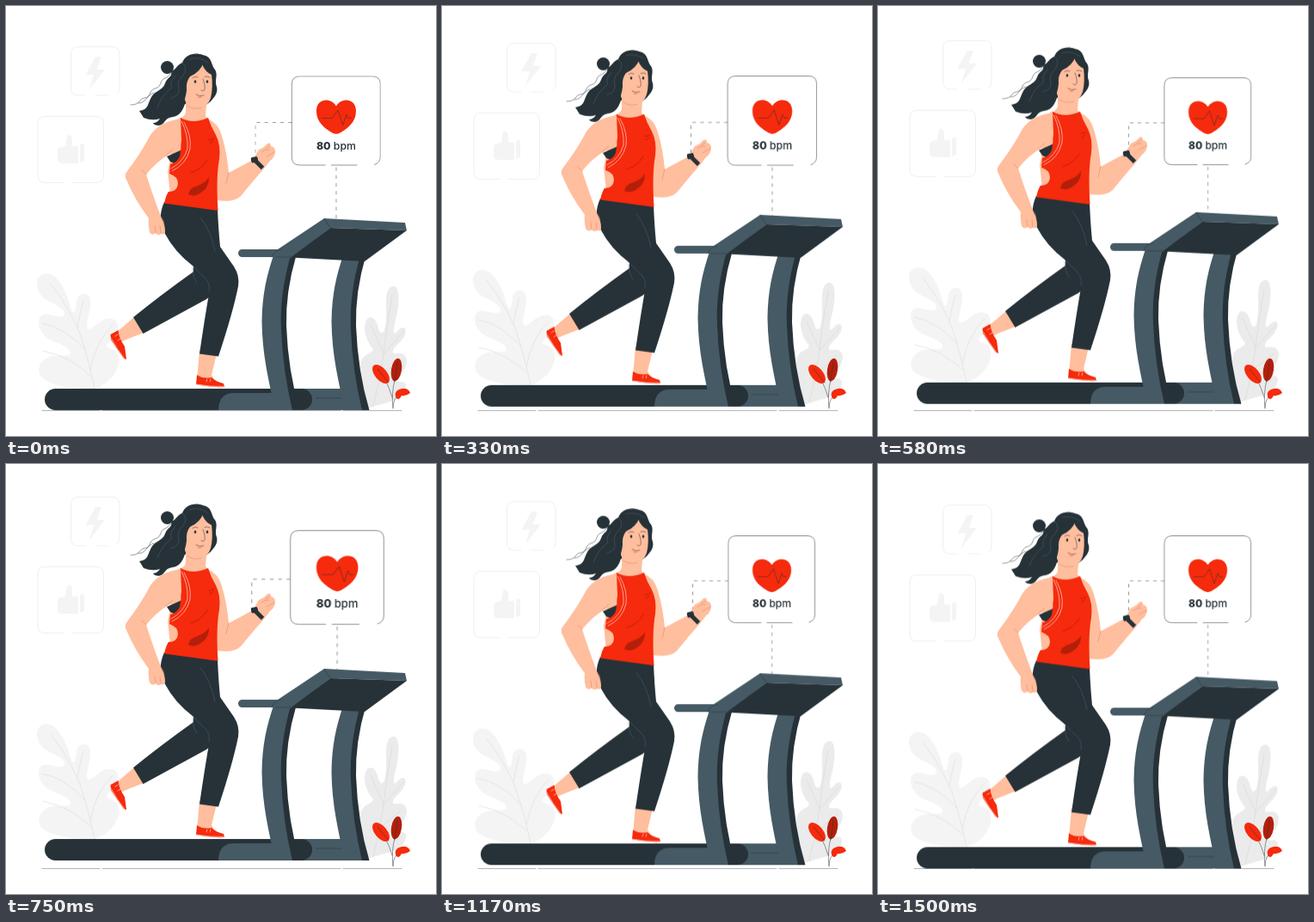
Animation, 500 px wide and 500 px high, one loop 1540 ms. Source, as an HTML page without scripts:

```html
<!DOCTYPE html>
<html lang="en">
<head>
<meta charset="utf-8">
<title>Treadmill run</title>
<style>
  :root { --ink: #263238; --slate: #455a64; --red: #f62a0c; --wine: #b31f0b; --skin: #ffbe9d; }
  html, body { margin: 0; width: 100%; height: 100%; overflow: hidden; background: #fff; }
  svg { display: block; width: 100vw; height: 100vh; }
  .bob { animation: bob 1540ms linear -37ms infinite; }
  .beat { transform-origin: 363px 161px; animation: beat 1540ms linear -37ms infinite; }
  @keyframes bob {
    0%, 100% { transform: translateY(.4px); }
    50% { transform: translateY(-9.2px); }
  }
  @keyframes beat {
    0%, 30%, 40%, 60%, 100% { transform: scale(1); }
    10%, 50% { transform: scale(1.09); }
  }
  .ink { fill: var(--ink); }
  .slate { fill: var(--slate); }
  .red { fill: var(--red); }
  .wine { fill: var(--wine); }
  .skin { fill: var(--skin); }
  .pale { fill: #f4f4f4; }
  .line { fill: none; stroke: var(--ink); stroke-width: .5; stroke-linecap: round; stroke-linejoin: round; }
  .line.frame { stroke: #ebebeb; stroke-width: .8; }
  .line.vein { stroke: #e3e3e3; stroke-width: .8; }
  .line.fold { stroke: #52656e; }
  .line.soft { stroke: #d98267; }
  .line.trim { stroke: #ffc4b8; stroke-width: .8; }
  .line.dash { stroke: #6b7478; stroke-dasharray: 4 5; stroke-linecap: butt; stroke-width: .7; }
  .line.ground { stroke-opacity: .7; }
  text { font: 500 12px Inter, sans-serif; fill: var(--ink); }
  .strong { font-weight: 800; }
</style>
</head>
<body>
<svg viewBox="0 0 500 500" xmlns="http://www.w3.org/2000/svg">
  <path class="line ground" d="M42 470.500H109M112 470.500H389M392 470.500H460"/>

  <!-- Badges and foliage -->
  <g class="bob">
    <path class="line frame" d="M92 104H84Q75.500 104 75.500 95.500V56Q75.500 47.500 84 47.500H123.500Q132 47.500 132 56V95.500Q132 100 129 102M104 104H119"/>
    <path class="pale" d="M104 59L92.500 80H102L97 97L115 74H105.500L111 59Z"/>
    <path class="line frame" d="M67 205.500H45.500Q37 205.500 37 197V137Q37 128.500 45.500 128.500H105Q113.500 128.500 113.500 137V197Q113.500 205.500 105 205.500H77"/>
    <path class="pale" d="M60 168Q60 165 64 164L69 163L71 151Q76 148 77 155V163H84V183H66Q60 183 60 178ZM86 161L91 160V180L86 182Z"/>

    <path class="pale" d="M36 323C36 312 48 307 58 316C68 326 73 342 76 353C79 360 81 354 82 344C83 333 96 331 98 342C99 352 95 361 94 371C94 383 104 369 116 364C129 361 133 371 129 379C124 388 117 392 117 396C120 400 129 398 131 407C134 419 124 438 103 445C82 446 57 443 44 434C34 427 38 414 48 409C57 404 73 409 75 404C76 397 61 393 51 388C40 382 35 369 40 361C48 354 61 365 67 360C72 354 59 348 51 344C41 339 36 332 36 323Z"/>
    <path class="line vein" d="M52 323Q82 362 91 397Q99 425 103 445M90 343Q85 360 83 374M42 369Q69 374 92 400M43 401Q76 408 98 430M124 371Q104 390 98 424"/>

    <path fill="#ebebeb" d="M442 344C442 329 447 325 452 326C458 329 457 345 455 356C453 366 450 374 451 380C454 383 456 373 463 374C468 379 461 389 454 395C449 400 448 405 454 404C464 402 468 409 465 418C462 428 453 430 453 436C456 439 463 434 465 441C465 453 451 460 440 462L417 469L412 455C410 440 411 425 413 414C415 404 426 405 427 399C423 394 417 386 417 374C418 358 428 359 432 371C434 380 437 383 440 377C443 367 442 354 442 344Z"/>
    <path class="line" stroke-opacity=".12" d="M449 337Q442 375 439 405Q435 436 427 465M424 371L439 404M462 379L440 404M460 411L436 431"/>
  </g>

  <!-- Pulse card -->
  <g class="beat">
    <path class="line dash" d="M333 136H291.500V178M383.500 187V245"/>
    <rect x="333" y="83.500" width="101" height="101" rx="9" fill="#fff"/>
    <path class="line" d="M427 184Q433.700 182 433.700 175V92.500Q433.700 83.500 425 83.500H342Q333 83.500 333 92.500V175.500Q333 184.500 342 184.500H371M378 184.500H407"/>
    <path class="red" d="M383.500 117.500C378 107.500 361 108 361 123C361 136 371 143 379.500 148Q383.500 150 387.500 148C396 143 406 136 406 123C406 108 389 107.500 383.500 117.500Z"/>
    <path class="line" d="M367 131H379L385.500 122L391 139L395 127L397 131H400.500"/>
    <text x="361" y="166.500"><tspan class="strong">80</tspan> bpm</text>
  </g>

  <g class="bob">
    <!-- Deck -->
    <rect class="slate" x="325" y="445" width="86" height="25" rx="12.500"/>
    <path class="line" d="M360 456H404M399 445.300Q410.700 446 410.700 457.500Q410.700 469 399 469.700"/>
    <rect class="ink" x="45" y="445" width="311" height="25" rx="12.500"/>
    <path class="slate" d="M247 470C247 457 253 450 265 450H322V470Z"/>

    <!-- Uprights -->
    <g id="post">
      <path class="ink" d="M325 290H337.500Q325 332 326 372Q328 425 341.500 470H322L312 372Z"/>
      <path class="slate" d="M311 290H331Q318 336 320 376Q322 425 333 470H313C305 434 298 405 297.500 367C298 335 303 314 311 290Z"/>
    </g>
    <use href="#post" x="81" y="0"/>

    <!-- Console -->
    <path class="slate" d="M274.500 283H316L370 247L464 252L466 261L377 258L332 293H311L312 292H274.500A4.500 4.500 0 0 1 274.500 283Z"/>
    <path class="ink" d="M377 258L466 261L417 297L331 292.500Z"/>
    <path class="line" d="M370 247.500L377 258M309 292Q312 284 320 283M313 292H331"/>

    <!-- Back leg -->
    <path class="skin" d="M150 361L160 380L142 387L133 391L129 379Z"/>
    <path class="red" d="M121.500 382L130.500 377Q131 386 138 396L140 411L137 410Q129 399 122 388Z"/>
    <path class="line trim" d="M122 386Q129 399 138 410.500M127 384l3-2M130 389l3-2"/>
    <path class="ink" d="M218 296V309Q180 336 148 362L159.500 381L233 341Q242 336 246 318Z"/>

    <!-- Front leg -->
    <path class="skin" d="M225 400H246L239 429L244 437L222 435Z"/>
    <path class="red" d="M222 429Q229 434 239 432Q244 437 253 439L254 443Q238 444 221 440Z"/>
    <path class="line trim" d="M221 440Q238 443 253 442.500M234 434l-1 3M238 434l-1 3"/>
    <path class="ink" d="M184 228L246 236Q247 260 249 280L265 303Q272 314 270 326Q264 356 247 407.500L225 404.500Q231 363 237 329Q233 316 217 302Q196 286 185 265Q175 248 184 228Z"/>
    <path class="line fold" d="M226 246Q238 261 243 285M217 302Q225 310 232 317Q238 324 236 332M217 304Q217 316 222 322"/>

    <!-- Far arm -->
    <path class="skin" d="M234 131Q247 136 251 151Q257 171 259 194L287 179L294 167Q300 165 304 160Q308 158 308 163Q313 164 313 169Q313 176 307 180L300 189Q286 205 273 221Q265 229 245 226L238 165Z"/>
    <path class="line soft" d="M297 170Q301 166 306 167M303 175L312 170M306 163L302 166M259 194L256 206"/>
    <path d="M288 178L298.500 188.500" fill="none" stroke="#263238" stroke-width="5"/>
    <rect class="ink" x="285" y="175.500" width="8" height="6.500" rx="2" transform="rotate(-12 289 179)"/>

    <!-- Hair behind -->
    <circle class="ink" cx="187.500" cy="71.500" r="7.500"/>
    <path class="ink" d="M192 76C198 74 199 68 205 66C208 57 219 53 229 57C240 59 238 68 243 74C247 80 242 87 245 94C247 102 241 107 238 111L228 119L208 114C205 123 201 128 194 129C184 130 185 138 178 139Q172 139 171 136Q176 136 179 131Q170 134 160 130Q157 125 155 122C165 121 165 114 168 108C172 98 182 99 185 90C187 83 194 83 192 76Z"/>
    <path class="line" d="M145 115C157 115 154 108 161 107C169 106 166 98 173 96C182 94 178 86 185 84C190 82 190 78 196 77M154 113C163 113 163 104 172 101"/>

    <!-- Torso -->
    <path class="skin" d="M209 106L233 115L232 128L238 135V228H192L188 192L193 168L200 131Q207 130 209 124Z"/>
    <path class="ink" d="M187 175L205 167L202 186L191 181Z"/>
    <path class="red" d="M203 130Q217 138 235 130Q238 140 244 150Q250 162 248 178Q244 200 246.500 238L184 229.500Q186 220 189 216Q199 216 200 207Q200 198 190 195L191 184Q199 182 202 175Q206 157 200 136Z"/>
    <path class="line trim" d="M204 134Q212 149 211 166Q207 181 192 189M207 135Q216 151 214 166Q210 184 193 192"/>
    <path class="wine" d="M212 219Q214 211 223 209Q233 205 236 199Q236 211 228 216Q220 223 212 219Z"/>
    <path class="line" style="stroke:#8e1808" d="M215 194Q228 190 234 179M236 156L242 154M237 160L241 157"/>

    <!-- Near arm -->
    <path class="skin" d="M203 131Q178 135 168 150Q157 171 141 192Q137 197 140 202Q150 226 166 247Q165 254 167 263Q170 268 174 264Q177 268 180 265Q185 267 185 262Q185 254 181 247Q172 224 163 196Q175 181 189 173Q204 168 204 155Z"/>
    <path class="line soft" d="M174 264L173 256M180 264L179 256M163 196L158 191M186 174L194 167M180 245Q184 249 184 254"/>

    <!-- Face -->
    <path class="skin" d="M209 84Q222 78 228 68Q232 77 239 80Q241 95 238 107Q234 118 226 118.500Q214 118 208 110Z"/>
    <path class="ink" d="M206 80Q216 68 230 65Q226 77 214 82Q209 88 210 98Q209 108 205 112Z"/>
    <path class="line fold" d="M205 66Q213 72 205 82Q198 88 201 96Q202 105 192 107M197 81Q189 91 193 95Q181 104 176 118M214 62Q224 58 235 66"/>
    <path class="line" stroke-width="1" d="M229 85Q232 93 231 97Q230 100 227 98M217 83.500Q220 81 223 83M231 82.500Q234 81 237 83M221 103Q225 106 230 104"/>
    <path class="line" style="stroke:var(--red)" d="M223 106Q225 107 227 106"/>
    <path class="line soft" d="M211 116Q218 121 227 118.500"/>
    <ellipse class="ink" cx="220" cy="88" rx="1.300" ry="1.800"/>
    <ellipse class="ink" cx="234" cy="88" rx="1.300" ry="1.800"/>
  </g>

  <!-- Red sprig -->
  <path class="line" d="M450 468Q448 450 452 435M449 455Q446 444 441 435M450 467Q450 456 458 451"/>
  <g class="red">
    <ellipse cx="436" cy="428" rx="7" ry="13" transform="rotate(-40 436 428)"/>
    <path d="M453 454Q451 447 460 445Q468 444 470 450Q465 454 460 453Q457 459 454 456Z"/>
  </g>
  <ellipse class="wine" cx="454" cy="423" rx="6" ry="13.500" transform="rotate(9 454 423)"/>
  <path class="line" d="M432 422L445 438M455 415L452 437"/>
</svg>
</body>
</html>
```
